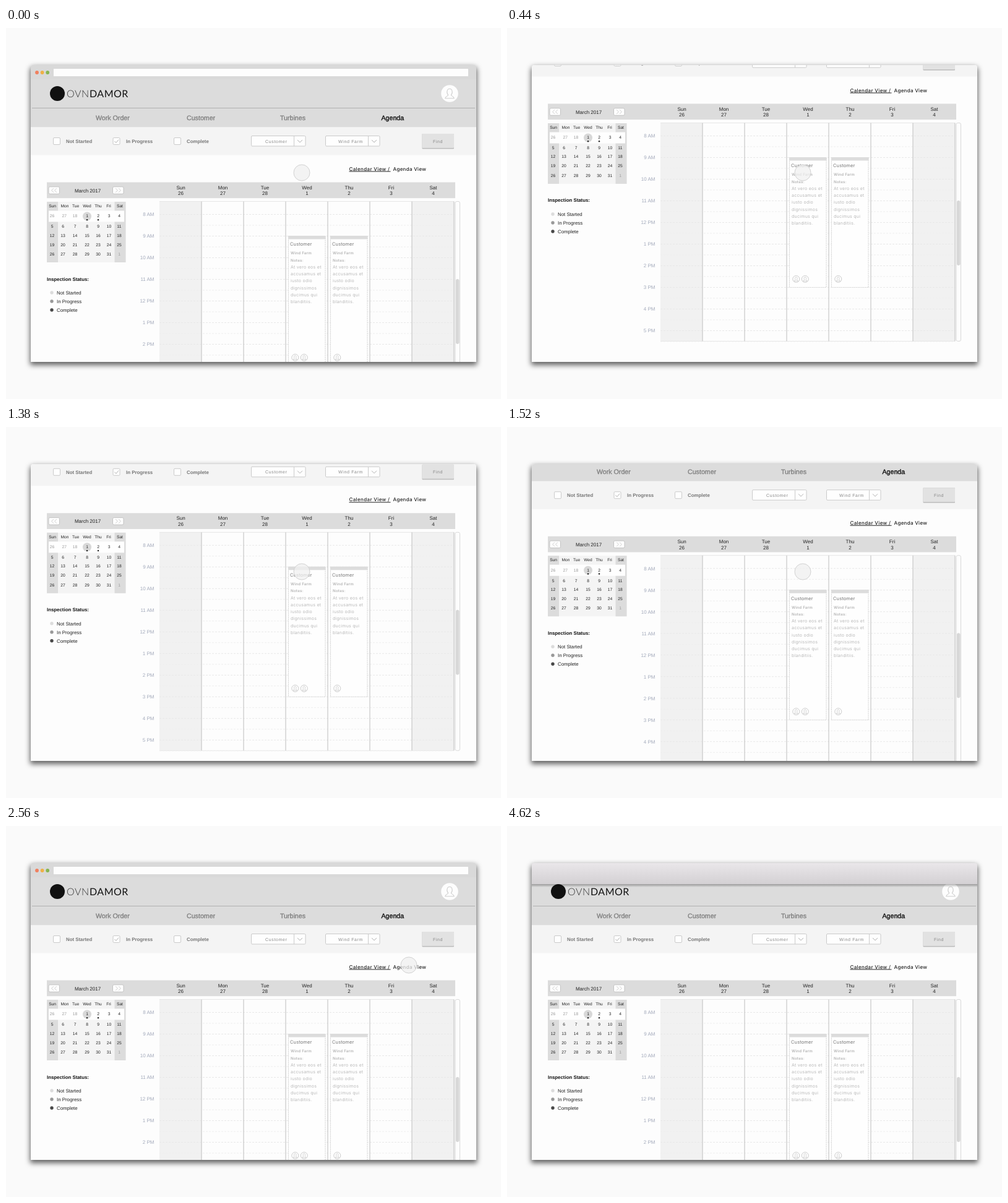
Write an HTML page that moves like this. It is 800x600 px and loops after 5.14 s.

```html
<!DOCTYPE html>
<html lang="en">
<head>
<meta charset="utf-8">
<title>Agenda scheduler</title>
<style>
  html, body { margin: 0; width: 100%; height: 100%; overflow: hidden; background: #fafafa; }
  #win {
    position: absolute; left: 40px; top: 60px; width: 720px; height: 480px;
    overflow: hidden; border-radius: 4px 4px 0 0; background: #fdfdfd;
    box-shadow: 0 4px 9px 1px rgba(0, 0, 0, .62);
  }
  svg { display: block; }
  text { font-family: "Liberation Sans", Arial, sans-serif; text-rendering: geometricPrecision; white-space: pre; }
  .ui { font-family: Inter, "Open Sans", sans-serif; }
  .brand { font-family: Lato, sans-serif; }
</style>
</head>
<body>
<div id="win"><svg id="art" width="720" height="480" viewBox="40 60 720 480"></svg></div>
<script>
const LOOP = 5140, DEPTH = 151;
const art = document.getElementById('art');

// Drawing helpers
const rect = (x, y, w, h, fill, more = '') =>
  `<rect x="${x}" y="${y}" width="${w}" height="${h}" fill="${fill}" ${more}/>`;
const disc = (x, y, r, fill, more = '') =>
  `<circle cx="${x}" cy="${y}" r="${r}" fill="${fill}" ${more}/>`;
const path = (d, color, w = 1, more = '') =>
  `<path d="${d}" fill="none" stroke="${color}" stroke-width="${w}" ${more}/>`;
const text = (x, y, s, size, fill, more = '') =>
  `<text x="${x}" y="${y}" font-size="${size}" fill="${fill}" ${more}>${s}</text>`;
const group = (id, body, more = '') => `<g id="${id}" ${more}>${body}</g>`;
const mid = 'text-anchor="middle"', bold = 'font-weight="700"';
const range = n => [...Array(n).keys()];

const person = (x, y, k, color) => path(
  'M-6.5 7C-6 3.5-2 4-2.2 2C-5-1-4-7 0-7S5-1 2.2 2C2 4 6 3.5 6.5 7Z',
  color, 1, `transform="translate(${x} ${y}) scale(${k})"`);

function header() {
  const nav = [[145, 'Work Order'], [292, 'Customer'], [443, 'Turbines'], [606.5, 'Agenda']];
  return rect(40, 60, 720, 100.5, '#dcdcdc') + rect(40, 60, 720, 23, '#d9d9d9') +
    disc(50, 72, 2.9, '#f0805f') + disc(58.6, 72, 2.9, '#efb045') + disc(67.2, 72, 2.9, '#86b552') +
    rect(77, 66, 670, 12, '#fdfdfd') +
    disc(83, 106, 12, '#111') +
    text(98, 112, 'OVN', 16, '#333', 'class="brand" font-weight="300" letter-spacing=".5"') +
    text(135, 112, 'DAMOR', 16, '#111', 'class="brand" letter-spacing=".5"') +
    disc(717, 106, 13.8, '#fdfdfd') + person(717, 106, 1.1, '#d0d0d0') +
    path('M42 129.5H758', '#b0b0b0') +
    nav.map(([x, s]) => {
      const c = s === 'Agenda' ? '#111' : '#808080';
      return text(x, 148.7, s, 10.65, c, `stroke="${c}" stroke-width=".35"`);
    }).join('');
}

function select(x, label) {
  return rect(x, 174.5, 87.5, 16.5, '#fefefe', 'rx="1.5" stroke="#cacaca"') +
    path(`M${x + 69} 175V191`, '#cacaca') +
    path(`M${x + 74.5} 181l4 4l4-4`, '#aaa', .9) +
    text(x + (label.length > 8 ? 20.5 : 22.5), 185.7, label, 7, '#888', 'letter-spacing=".65"');
}

function filters() {
  const boxes = [[76.5, 97, 'Not Started'], [173, 194, 'In Progress'], [271.5, 292, 'Complete']];
  return rect(40, 160.5, 720, 45, '#f4f4f4') +
    boxes.map(([x, tx, s]) =>
      rect(x, 177.5, 11, 11, '#fefefe', 'rx="1.5" stroke="#cacaca"') +
      text(tx, 185.9, s, 7.85, '#777', bold)).join('') +
    path('M175.5 183l2.3 2.6l4.2-5', '#b4b4b4') +
    select(396.5, 'Customer') + select(516.5, 'Wind Farm') +
    rect(672.5, 171, 51.5, 24.5, '#bcbcbc', 'rx="1"') + rect(672.5, 171, 51.5, 23, '#e2e2e2', 'rx="1"') +
    text(690, 185.6, 'Find', 7, '#888', 'letter-spacing=".6"');
}

function viewLinks() {
  const style = 'class="ui" font-weight="500"';
  return text(554.5, 230.6, 'Calendar View /', 8, '#222', style + ' letter-spacing=".35"') +
    text(625.5, 230.6, 'Agenda View', 8, '#222', style + ' letter-spacing=".28"') +
    path('M554.5 232H621.5', '#222', 1, 'id="lineCal"') +
    path('M625.5 232H679', '#222', 1, 'id="lineAg"');
}

function monthPanel() {
  const arrow = (x, dir) => rect(x, 256.8, 17.5, 11.5, '#fefefe', 'rx="2" stroke="#c4c4c4"') +
    [-2.5, 2.5].map(o => path(`M${x + 8.75 + o + dir * -1.7} 259.3l${dir * 3.4} 3.3l${dir * -3.4} 3.3`, '#c4c4c4', .8)).join('');
  const cols = [74.5, 92, 111.5, 131, 149, 166.5, 183];
  const heads = [75, 95, 112.5, 131, 149, 166, 184];
  const rows = [306.3, 323.3, 337.5, 352.5, 367.8];
  const days = 'Sun Mon Tue Wed Thu Fri Sat'.split(' ');
  const nums = [26, 27, 18, ...range(31).map(i => i + 1), 1];
  return arrow(69, -1) + arrow(172.5, 1) + text(132, 265.6, 'March 2017', 8, '#222', mid) +
    rect(66, 281, 127.5, 98, '#f4f4f4') + rect(66, 281, 18, 98, '#dcdcdc') + rect(175.5, 281, 18, 98, '#dcdcdc') +
    rect(69, 295.5, 122, 18, '#fefefe') + disc(131, 304.5, 7, '#d8d8d8') +
    disc(131, 310.2, 1.2, '#222') + disc(149, 310.2, 1.2, '#222') +
    days.map((d, i) => text(heads[i], 290, d, 6.6, '#222', mid)).join('') +
    nums.map((n, i) => text(cols[i % 7] + (i === 1 ? 2.3 : 0), rows[i / 7 | 0], n, 6.7,
      i < 3 || i === 34 ? '#999' : '#222', mid)).join('');
}

function legend() {
  const items = [['Not Started', '#dcdcdc'], ['In Progress', '#999'], ['Complete', '#484848']];
  return text(66, 408.5, 'Inspection Status:', 7.85, '#111', bold) +
    items.map(([s, c], i) => disc(74, 428 + 14 * i, 2.7, c) +
      text(82, 430.9 + 14 * i, s, 7.85, '#222')).join('');
}

function visit(x, crew) {
  const lines = ['At vero eos et', 'accusamus et', 'iusto odio', 'dignissimos', 'ducimus qui', 'blanditiis.'];
  const head = 'class="ui" font-weight="600" letter-spacing=".2"';
  return rect(x + .5, 336.5, 59.5, 210, '#fefefe', 'stroke="#d4d4d4" stroke-dasharray="2 1"') +
    rect(x, 336, 60.5, 5.5, '#dcdcdc') +
    text(x + 3, 352.3, 'Customer', 7.5, '#777', 'class="ui" letter-spacing=".12"') +
    text(x + 4, 366.4, 'Wind Farm', 6.2, '#b4b4b4', head) +
    text(x + 4, 377.7, 'Notes:', 6.2, '#b4b4b4', head) +
    lines.map((s, i) => text(x + 4, 388.9 + 11.25 * i, s, 7, '#b8b8b8', 'class="ui" letter-spacing=".28"')).join('') +
    range(crew).map(i => disc(x + 11.3 + 14.5 * i, 533, 5.5, 'none', 'stroke="#c0c0c0" stroke-width=".8"') +
      person(x + 11.3 + 14.5 * i, 533, .48, '#a8a8a8')).join('');
}

function week() {
  const days = [['Sun', 26], ['Mon', 27], ['Tue', 28], ['Wed', 1], ['Thu', 2], ['Fri', 3], ['Sat', 4]];
  const hours = range(10).map(i => `${(i + 7) % 12 + 1} ${i < 4 ? 'AM' : 'PM'}`);
  return days.map(([d, n], i) => text(282.5 + 68 * i, 260.7, d, 8, '#222', mid) +
      text(282.5 + 68 * i, 270.3, n, 8, '#222', mid)).join('') +
    rect(248, 280.5, 68, 353, '#f1f1f1') + rect(656, 280.5, 68, 353, '#f1f1f1') +
    path('M248 280.5H724M248 633.5H724', '#e6e6e6') +
    range(20).map(i => path(`M248 ${301.5 + 17.5 * i}H724`, i % 2 ? '#eee' : '#e8e8e8', 1,
      'stroke-dasharray="3 2"')).join('') +
    hours.map((h, i) => text(239.5, 304.4 + 35 * i, h, 8, '#a3aabb', 'text-anchor="end"')).join('') +
    range(7).map(i => path(`M${316 + 68 * i} 280.5V633.5`, '#c8c8c8', 1.2)).join('') +
    visit(456, 2) + visit(524, 1) +
    rect(726, 280.5, 7.5, 353, '#fdfdfd', 'rx="2.5" stroke="#d8d8d8"') +
    rect(727, 406, 5.5, 105, '#d8d8d8', 'rx="2.7"');
}

art.innerHTML =
  `<defs><linearGradient id="bar" x2="0" y2="1"><stop stop-color="#ebe8eb"/><stop offset="1" stop-color="#d3d0d3"/></linearGradient>
   <linearGradient id="dim" x2="0" y2="1"><stop stop-opacity=".3"/><stop offset="1" stop-opacity="0"/></linearGradient></defs>` +
  group('page', header() + filters() + viewLinks() + rect(66, 249.5, 660, 25.7, '#dcdcdc') +
    monthPanel() + legend() + group('week', week())) +
  group('touch', disc(0, 0, 13, '#f0f0f0', 'fill-opacity=".75" stroke="#d2d2d2"')) +
  group('arrow', '<path d="M0 0V8L1.9 6.3L3.1 9L4.3 8.5L3.2 5.9H5.6Z" fill="#111" stroke="#fff" stroke-width=".4"/>') +
  group('sheet', rect(40, 24, 720, 36, 'url(#bar)') + rect(40, 60, 720, 5, 'url(#dim)'));

const el = Object.fromEntries(['page', 'week', 'lineCal', 'lineAg', 'touch', 'arrow', 'sheet']
  .map(id => [id, document.getElementById(id)]));

// Motion
const part = (t, a, b) => Math.min(1, Math.max(0, (t - a) / (b - a)));
const smooth = u => u * u * (3 - 2 * u);
const move = (node, x, y) => node.setAttribute('transform', `translate(${x} ${y})`);
const fade = (node, v) => node.setAttribute('opacity', v);

// Table rows: time followed by values, eased from row to row
function track(rows, t) {
  const i = rows.findIndex(r => r[0] > t);
  if (i === 0) return rows[0].slice(1);
  if (i < 0) return rows[rows.length - 1].slice(1);
  const [a, b] = [rows[i - 1], rows[i]], u = smooth(part(t, a[0], b[0]));
  return a.slice(1).map((v, k) => v + (b[k + 1] - v) * u);
}

const touchPath = [[0, 478, 234, 1], [550, 478, 234, 1], [800, 480, 234, .5], [860, 480, 234, .5],
  [1060, 478, 234, 1], [1900, 478, 234, 1], [2100, 653, 217, 1], [2160, 653, 217, 1], [2540, 651, 225, 1]];
const arrowPath = [[2940, 651, 225], [3060, 634, 219], [3300, 590, 234], [3460, 602, 231],
  [4000, 602, 231], [4130, 662, 100]];

function draw(t) {
  const down = smooth(part(t, 20, 550) ** 1.25), up = smooth(part(t, 1100, 1920));
  move(el.page, 0, -DEPTH * (down - up));

  const agenda = part(t, 2720, 2820) - part(t, 3560, 3660);
  fade(el.week, 1 - agenda);
  fade(el.lineCal, 1 - agenda);
  fade(el.lineAg, agenda);

  const [tx, ty, alpha] = track(touchPath, t);
  move(el.touch, tx, ty);
  fade(el.touch, t < 2680 ? alpha : 0);

  move(el.arrow, ...track(arrowPath, t));
  fade(el.arrow, t >= 2680 && t < 4140 ? 1 : 0);

  const drop = smooth(part(t, 4400, 4620));
  move(el.sheet, 0, 34 * drop);
  fade(el.sheet, drop > 0 ? 1 : 0);
}

const start = performance.now();
function tick() {
  const t = (performance.now() - start) % LOOP;
  draw(Math.floor(t / 20) * 20);
  requestAnimationFrame(tick);
}
tick();
</script>
</body>
</html>
```
